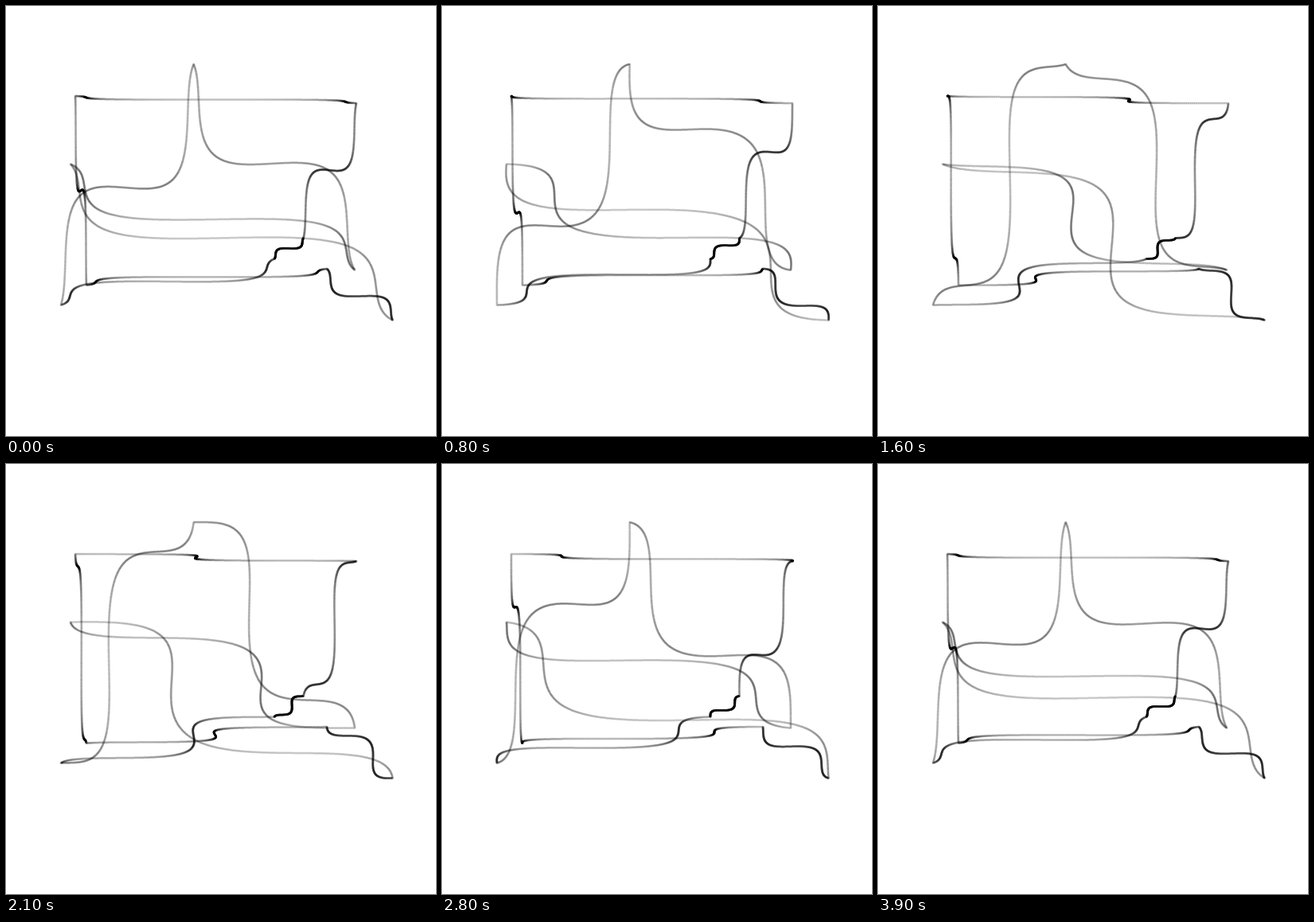
An HTML page with a canvas that plays this animation: 540 px wide and 540 px high, repeating every 4 s.

```html
<!DOCTYPE html>
<html lang="en">
<head>
<meta charset="utf-8">
<title>Looping path</title>
<style>
  html, body { margin: 0; width: 100%; height: 100%; overflow: hidden; background: #fff; }
  canvas { display: block; }
</style>
</head>
<body>
<canvas id="stage" width="540" height="540"></canvas>
<script>
const ctx = document.getElementById('stage').getContext('2d');
const LOOP = 4000, STEP = 100;
const DOTS = 400, RADIUS = 1.5, ALPHA = 0.17;
const AMPLITUDE = 0.185, FREQUENCY = 0.94;
const OFFSET = 0.096, DELAY = 0.0102;

// Corners of one closed path; each edge lags a little behind the previous one.
const points = [
  [403, 330], [485.5, 394.5], [81, 198.5], [438, 331.5], [235.7, 73], [69, 375.5],
  [337, 317.5], [373.5, 291.5], [440, 122], [87, 113], [101, 350.5]
];

function ease(u, power) {
  return u < 0.5 ? 0.5 * (2 * u) ** power : 1 - 0.5 * (2 - 2 * u) ** power;
}

function phaseAt(time) {
  const u = time + OFFSET;
  return ease(u - Math.floor(u), 1.7);
}

const mix = (a, b, k) => a + (b - a) * k;

function dot(x, y) {
  ctx.beginPath();
  ctx.arc(x, y, RADIUS, 0, 2 * Math.PI);
  ctx.fill();
}

// x and y advance in turn, as opposite waves that fade out at both ends.
function drawEdge([x0, y0], [x1, y1], phase) {
  for (let i = 0; i < DOTS; i++) {
    const p = i / DOTS;
    const envelope = 1 - Math.abs(2 * p - 1) ** 3;
    const turn = FREQUENCY * (p - 0.5) - phase;
    const wave = AMPLITUDE * envelope * Math.sin(2 * Math.PI * turn);
    dot(mix(x0, x1, p + wave), mix(y0, y1, p - wave));
  }
}

function draw(time) {
  ctx.fillStyle = '#fff';
  ctx.fillRect(0, 0, 540, 540);
  ctx.fillStyle = `rgba(0, 0, 0, ${ALPHA})`;
  points.forEach((from, i) => {
    drawEdge(from, points[(i + 1) % points.length], phaseAt(time - DELAY * i));
  });
}

const start = performance.now();
let shown = -1;
function tick() {
  const elapsed = (performance.now() - start) % LOOP;
  const step = Math.floor(elapsed / STEP);
  if (step !== shown) {
    shown = step;
    draw(step * STEP / LOOP);
  }
  requestAnimationFrame(tick);
}
tick();
</script>
</body>
</html>
```
